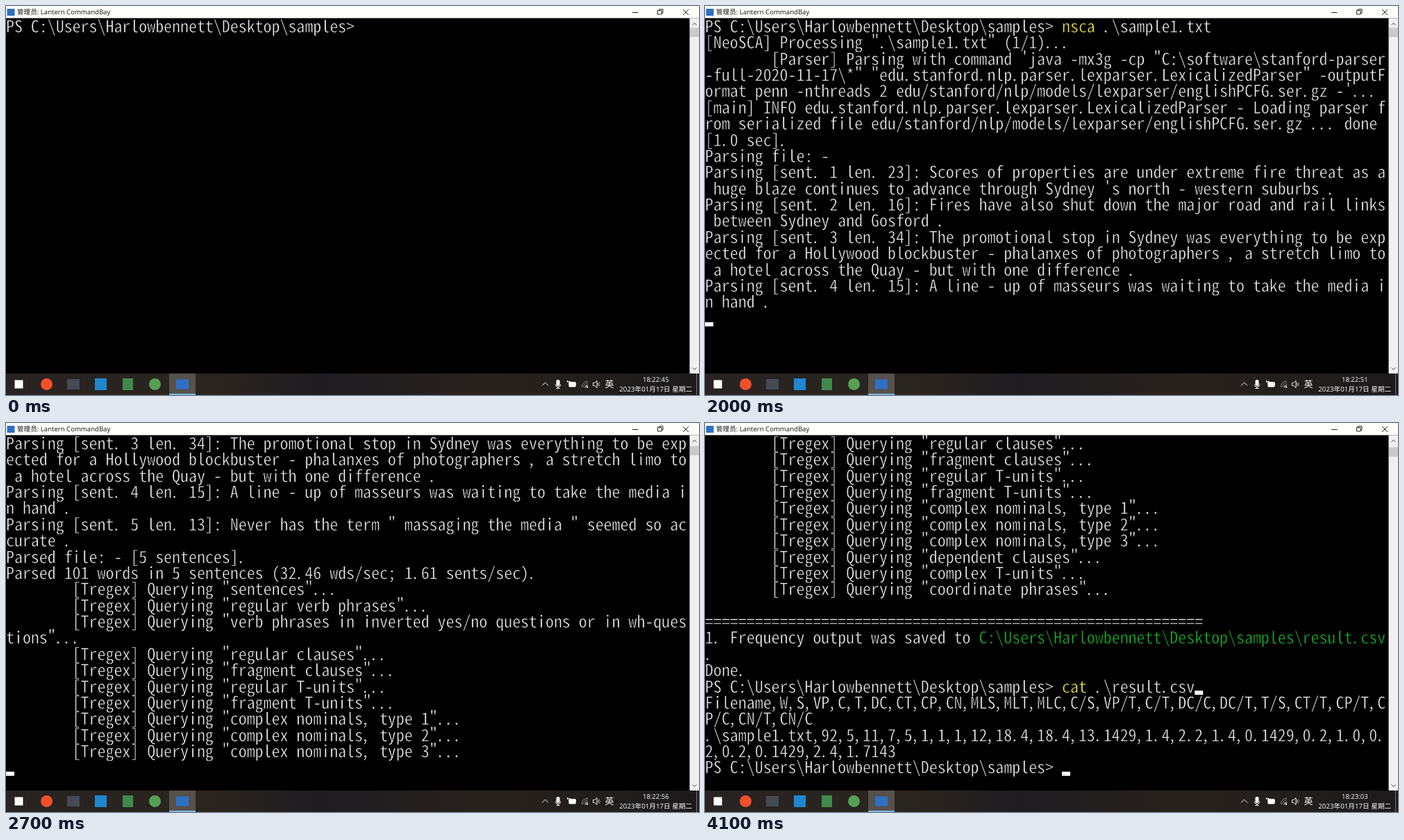
An HTML page that plays this animation: 998x561 px, repeating every 4200 ms.

```html
<!DOCTYPE html>
<html lang="zh">
<head>
<meta charset="utf-8">
<title>Console session</title>
<style>
html, body { margin: 0; width: 100%; height: 100%; overflow: hidden; background: #000; }
svg { display: block; width: 100vw; height: 100vh; }
text { text-rendering: geometricPrecision; white-space: pre; }
/* The black outline thins the letter strokes */
#rows text {
  font: 23.9px "Noto Sans Mono CJK SC", "Liberation Mono", monospace;
  font-variant-ligatures: none;
  text-anchor: middle;
  fill: #ececec; stroke: #000; stroke-width: .5px;
}
.ui { font-family: "Open Sans", "Noto Sans CJK SC", "Noto Sans CJK", sans-serif; }
.line { fill: none; stroke-width: 1; }
</style>
</head>
<body>
<svg viewBox="0 0 998 561" preserveAspectRatio="none">
  <defs>
    <linearGradient id="bar">
      <stop offset="0" stop-color="#282322"/>
      <stop offset=".3" stop-color="#2b251f"/>
      <stop offset=".45" stop-color="#1f1c21"/>
      <stop offset=".7" stop-color="#28221d"/>
      <stop offset="1" stop-color="#1c1a1c"/>
    </linearGradient>
  </defs>
  <rect width="998" height="561"/>

  <g id="rows"></g>
  <g fill="#fff">
    <rect id="cursor" width="12" height="6"/>
    <rect id="trail" width="12" height="6"/>
  </g>

  <g id="titlebar">
    <rect width="998" height="17.5" fill="#fffffb"/>
    <rect x="1.5" y="4" width="11" height="10" fill="#2f6fc4"/>
    <text class="ui" x="16" y="12.3" font-size="9.6" fill="#111">管理员: Lantern CommandBay</text>
    <path class="line" stroke="#222" d="M902 9.5h8.5M938.5 6.5h5.5v5.5h-5.5zM940.5 6.5v-1.8h5.5v5.5h-2M975 5l8 8M983 5l-8 8"/>
  </g>

  <g id="scrollbar">
    <rect x="984.5" y="17.5" width="13.5" height="512.5" fill="#f0f0f0"/>
    <rect id="thumb" x="985" width="13" height="13.5" fill="#cacaca"/>
    <path class="line" stroke="#444" d="M988.5 27.5l3-3 3 3M988.5 521.5l3 3 3-3"/>
  </g>

  <g id="taskbar">
    <rect y="530" width="998" height="31" fill="url(#bar)"/>
    <rect x="235" y="530" width="38" height="31" fill="#57514b"/>
    <rect x="235" y="559" width="38" height="2" fill="#76b5e8"/>
    <rect x="12.5" y="539.5" width="12" height="12" fill="#fff"/>
    <circle cx="58.5" cy="545.5" r="8.5" fill="#f2502a"/>
    <rect x="88" y="538" width="18" height="15" fill="#454b55"/>
    <rect x="128" y="537" width="17" height="17" fill="#1f86d0"/>
    <rect x="168" y="537" width="15" height="17" fill="#3f8a4c"/>
    <circle cx="214.5" cy="545.5" r="8.5" fill="#56a053"/>
    <rect x="245" y="538.5" width="18" height="14" fill="#2f6fc4"/>

    <path class="line" stroke="#eee" d="M772 547.5l4.5-4.5 4.5 4.5"/>
    <rect x="792.5" y="539" width="5" height="9" rx="2.2" fill="#fff"/>
    <path class="line" stroke="#fff" d="M791.5 545.5v1q0 3 3.5 3t3.5-3v-1M795 549.5v2M792.5 551.5h5"/>
    <rect x="811" y="543" width="9" height="6" fill="#fff"/>
    <path class="line" stroke="#fff" d="M809.5 541.5h3M808.5 540v3M811 542v4M811 542.5h9v6.5h-9zM820.5 544v3"/>
    <path class="line" stroke="#888" d="M829 550a9 9 0 0 1 9-9M831.5 550a6.5 6.5 0 0 1 6.5-6.5"/>
    <path class="line" stroke="#eee" d="M834 550.5a4 4 0 0 1 4-4"/>
    <circle cx="837" cy="549.5" r="1.2" fill="#fff"/>
    <path class="line" stroke="#eee" d="M845.5 543.5h2l3.5-3v10l-3.5-3h-2zM852.5 543.5q1.5 2 0 4"/>
    <path class="line" stroke="#888" d="M854 542q2.5 3.5 0 7"/>
    <g class="ui" fill="#fff" text-anchor="middle">
      <text x="869" y="550" font-size="13">英</text>
      <text id="clock" x="935.8" y="541.7" font-size="9.5"></text>
      <text x="935.8" y="556" font-size="9.7">2023年01月17日 星期二</text>
    </g>
    <path class="line" stroke="#777" d="M994.5 530v31"/>
  </g>
</svg>

<script>
const NS = "http://www.w3.org/2000/svg";
const LOOP = 4200, STEP = 100;
const COLS = 82, ROWS = 21, CELL = 11.953, LEAD = 23.37, BASE = 38;
const YELLOW = "#f5ec3d", GREEN = "#16b424";
const $ = id => document.getElementById(id);

const HOME = String.raw`C:\Users\Harlowbennett\Desktop\samples`;
const PROMPT = `PS ${HOME}> `;
const MODEL = "edu/stanford/nlp/models/lexparser/englishPCFG.ser.gz";
const LEXER = "edu.stanford.nlp.parser.lexparser.LexicalizedParser";

// Console output: [step, text, colour]
const log = [];
const put = (step, text, color) => log.push([step, text, color]);
const type = (step, text, color) => [...text].forEach((ch, i) => put(step + i, ch, color));
const query = (step, name) => put(step, `        [Tregex] Querying "${name}"...\n`);
const sentence = (step, n, len, text) => put(step, `Parsing [sent. ${n} len. ${len}]: ${text}\n`);

put(0, PROMPT);
type(4, "nsca", YELLOW);
type(8, " sam");
put(12, "\b\b\b" + String.raw`.\sample1.txt`);
put(13, "\n");
put(14, String.raw`[NeoSCA] Processing ".\sample1.txt" (1/1)...` + "\n");
put(14, String.raw`        [Parser] Parsing with command 'java -mx3g -cp "C:\software\stanford-parser-full-2020-11-17\*" "${LEXER}" -outputFormat penn -nthreads 2 ${MODEL} -'...` + "\n");
put(16, `[main] INFO ${LEXER} - Loading parser from serialized file ${MODEL} ...`);
put(18, " done [1.0 sec].\nParsing file: -\n");
sentence(18, 1, 23, "Scores of properties are under extreme fire threat as a huge blaze continues to advance through Sydney 's north - western suburbs .");
sentence(19, 2, 16, "Fires have also shut down the major road and rail links between Sydney and Gosford .");
sentence(19, 3, 34, "The promotional stop in Sydney was everything to be expected for a Hollywood blockbuster - phalanxes of photographers , a stretch limo to a hotel across the Quay - but with one difference .");
sentence(20, 4, 15, "A line - up of masseurs was waiting to take the media in hand .");
sentence(21, 5, 13, 'Never has the term " massaging the media " seemed so accurate .');
put(22, "Parsed file: - [5 sentences].\nParsed 101 words in 5 sentences (32.46 wds/sec; 1.61 sents/sec).\n");
query(22, "sentences");
query(23, "regular verb phrases");
query(23, "verb phrases in inverted yes/no questions or in wh-questions");
query(24, "regular clauses");
query(24, "fragment clauses");
query(25, "regular T-units");
query(26, "fragment T-units");
query(26, "complex nominals, type 1");
query(27, "complex nominals, type 2");
query(27, "complex nominals, type 3");
query(28, "dependent clauses");
query(28, "complex T-units");
query(28, "coordinate phrases");
put(29, "\n" + "=".repeat(60) + "\n1. Frequency output was saved to ");
put(29, HOME + String.raw`\result.csv`, GREEN);
put(29, ".\nDone.\n");
put(30, PROMPT);
type(31, "cat", YELLOW);
type(34, " re");
put(37, "\b\b" + String.raw`.\result.csv`);
put(41, "\nFilename,W,S,VP,C,T,DC,CT,CP,CN,MLS,MLT,MLC,C/S,VP/T,C/T,DC/C,DC/T,T/S,CT/T,CP/T,CP/C,CN/T,CN/C\n");
put(41, String.raw`.\sample1.txt,92,5,11,7,5,1,1,1,12,18.4,18.4,13.1429,1.4,2.2,1.4,0.1429,0.2,1.0,0.2,0.2,0.1429,2.4,1.7143` + "\n");
put(41, PROMPT);

// Lays the output so far into wrapped rows of [char, colour] cells
function layout(step) {
  const rows = [[]];
  for (const [at, text, color] of log) {
    if (at > step) break;
    for (const ch of text) {
      let row = rows[rows.length - 1];
      if (ch === "\b") { row.pop(); continue; }
      if (ch === "\n") { rows.push([]); continue; }
      if (row.length === COLS) rows.push(row = []);
      row.push([ch, color]);
    }
  }
  return rows;
}

const lines = Array.from({ length: ROWS }, (_, i) => {
  const el = document.createElementNS(NS, "text");
  el.setAttribute("y", BASE + i * LEAD);
  return $("rows").appendChild(el);
});

// Low punctuation sits in the left part of its cell
const charX = (ch, col) => ((col + (".,".includes(ch) ? 0.28 : 0.5)) * CELL).toFixed(2);

function fillLine(el, cells) {
  el.textContent = "";
  let span, last;
  cells.forEach(([ch, color], col) => {
    if (!span || color !== last) {
      span = el.appendChild(document.createElementNS(NS, "tspan"));
      span.setAttribute("x", "");
      if (color) span.style.fill = color;
      last = color;
    }
    span.textContent += ch;
    span.setAttribute("x", `${span.getAttribute("x")} ${charX(ch, col)}`.trim());
  });
}

function placeCursor(el, col, row, on) {
  el.setAttribute("x", col * CELL);
  el.setAttribute("y", BASE - 2.6 + row * LEAD);
  el.setAttribute("visibility", on ? "visible" : "hidden");
}

// Seconds after 18:22:00 at a few steps, linear between them
const ticks = [[0, 45], [10, 48], [20, 51], [25, 55], [29, 58], [38, 62], [41, 63]];
function clockText(step) {
  const i = Math.max(1, ticks.findIndex(([s]) => s >= step));
  const [[s0, v0], [s1, v1]] = [ticks[i - 1], ticks[i]];
  const sec = Math.floor(v0 + (v1 - v0) * (step - s0) / (s1 - s0) + 1e-6);
  const two = n => String(n).padStart(2, "0");
  return `18:${two(22 + Math.floor(sec / 60))}:${two(sec % 60)}`;
}

function draw(step) {
  const rows = layout(step);
  const end = rows.length - 1;
  const scroll = Math.max(0, end - ROWS + 1);
  lines.forEach((el, i) => fillLine(el, rows[scroll + i] || []));
  placeCursor($("cursor"), rows[end].length, end - scroll, step > 1);
  placeCursor($("trail"), 59, 41 - scroll, step >= 41);
  $("thumb").setAttribute("y", 31.3 + scroll * 0.145);
  $("clock").textContent = clockText(step);
}

let shown = -1;
function tick() {
  const step = Math.floor(performance.now() % LOOP / STEP);
  if (step !== shown) draw(shown = step);
  requestAnimationFrame(tick);
}
tick();
</script>
</body>
</html>
```
